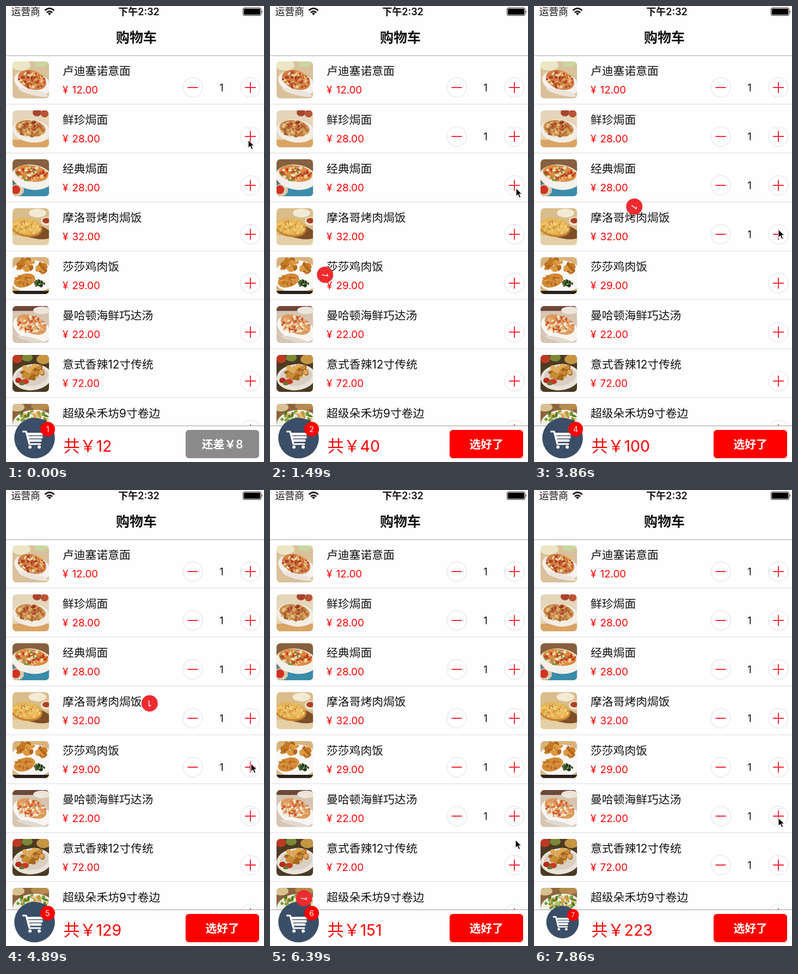
These frames come from a looping animation (474x839 px, 8 s). An HTML page:

```html
<!DOCTYPE html>
<html lang="zh-CN">
<head>
<meta charset="utf-8">
<title>购物车</title>
<style>
  html, body { margin: 0; width: 100%; height: 100%; overflow: hidden; background: #fff; }
  svg { display: block; width: 100vw; height: 100vh; }
  text { font-family: Inter, "Noto Sans CJK SC", "Noto Sans CJK", sans-serif; fill: #111; white-space: pre; }
  .mid { text-anchor: middle; }
  .red { fill: #f00; }
  .white { fill: #fff; }
</style>
</head>
<body>
<svg id="stage" viewBox="0 0 474 839">
  <defs>
    <clipPath id="photo"><rect width="67" height="68" rx="7"/></clipPath>
  </defs>
  <rect width="474" height="839" fill="#fefefe"/>

  <text x="9.5" y="17" font-size="17.8">运营商</text>
  <g fill="none" stroke="#111" stroke-width="2.7">
    <path d="M71.5 8.3Q80 .6 88.5 8.3"/>
    <path d="M74.9 12Q80 7.4 85.1 12"/>
  </g>
  <path d="M76.9 13.6Q80 10.9 83.1 13.6L80 17Z" fill="#111"/>
  <text class="mid" x="244" y="17" font-size="18" font-weight="600">下午2:32</text>
  <rect x="435.5" y="3.5" width="33" height="14" rx="2.5" fill="#fff" stroke="#111"/>
  <rect x="437" y="5" width="30" height="11" rx="1.2"/>
  <path d="M470 8q2 2.5 0 5z"/>
  <text class="mid" x="239.5" y="67" font-size="25" font-weight="600">购物车</text>
  <path d="M0 91.5H474" stroke="#a9a9a9"/>

  <g id="list"></g>

  <rect y="772" width="474" height="67" fill="#fefefe"/>
  <path d="M0 772.5H474" stroke="#9c9c9c"/>
  <text class="red" x="105.5" y="819.5" font-size="30">共￥</text>
  <text id="total" class="red" x="165.5" y="819.5" font-size="28.5"></text>
  <rect id="button" x="330" y="780" width="135" height="52" rx="6"/>
  <text id="label" class="mid white" x="397.7" y="813.5" font-size="20.8" font-weight="600"></text>

  <g id="cart">
    <circle cx="52.5" cy="795" r="37.3" fill="#3b4e68"/>
    <g fill="none" stroke="#fff" stroke-width="3.2" stroke-linecap="round" stroke-linejoin="round">
      <path d="M31.5 783H37L43 806H63"/>
      <path d="M40 787.5H67M41.5 793.5H65.5M43 799.5H63.5" stroke-width="4.5"/>
    </g>
    <circle cx="44" cy="811.5" r="3" fill="#fff"/>
    <circle cx="61" cy="811.5" r="3" fill="#fff"/>
    <circle cx="76.5" cy="778.5" r="13.5" fill="#f00"/>
    <text id="badge" class="mid white" x="76.5" y="783.5" font-size="14"></text>
  </g>

  <g id="ball">
    <circle r="15" fill="#ee2b30"/>
    <text class="mid white" y="5.5" font-size="15.5">1</text>
  </g>
  <path id="cursor" d="M0 0V15.5L3.6 12.2L6 18L8.8 16.8L6.4 11.2H11.2Z" fill="#000" stroke="#fff" stroke-width="1.2"/>
</svg>

<script>
const $ = id => document.getElementById(id);
const LOOP = 8000, TICK = 148.4, FLIGHT = 5;
const CART = { x: 53, y: 795 };
const PLUS_X = 449;

// start: tick at which the dish is added (0 = in the cart already)
const dishes = [
  { name: '卢迪塞诺意面', price: 12, start: 0 },
  { name: '鲜珍焗面', price: 28, start: 5.975 },
  { name: '经典焗面', price: 28, start: 15.425 },
  { name: '摩洛哥烤肉焗饭', price: 32, start: 23.235 },
  { name: '莎莎鸡肉饭', price: 29, start: 31.2 },
  { name: '曼哈顿海鲜巧达汤', price: 22, start: 38.215 },
  { name: '意式香辣12寸传统', price: 72, start: 47.04 },
  { name: '超级朵禾坊9寸卷边', price: 75, start: Infinity }
];

const oval = (x, y, rx, ry, fill, turn = 0) =>
  `<ellipse cx="${x}" cy="${y}" rx="${rx}" ry="${ry}" fill="${fill}" transform="rotate(${turn} ${x} ${y})"/>`;
const box = (y, h, fill) => `<rect y="${y}" width="67" height="${h}" fill="${fill}"/>`;

function random(seed) {
  return () => (seed = seed * 16807 % 2147483647) / 2147483647;
}

// scatter small pieces of food over an oval
function scatter(seed, x, y, rx, ry, n, size, colors) {
  const rnd = random(seed * 7919);
  let out = '';
  for (let i = 0; i < n; i++) {
    const a = rnd() * 6.283, d = Math.sqrt(rnd());
    out += oval(x + Math.cos(a) * d * rx, y + Math.sin(a) * d * ry,
      size * (.6 + rnd() * .6), size * (.4 + rnd() * .4), colors[i % colors.length], rnd() * 180);
  }
  return out;
}

const pasta = ['#b8482c', '#e2a55c', '#f0d3a0', '#a8381f', '#d27b3c'];
const fried = ['#c67a26', '#dc9a42', '#b4661c'];
const photos = [
  () => box(0, 68, '#d9c19a') + oval(16, 7, 17, 10, '#ece6c4') + oval(52, 4, 12, 7, '#c9d6a2') +
    oval(37, 40, 35, 21, '#f5f1ec', 20) + oval(36, 34, 27, 17, '#cf8149', 20) +
    scatter(1, 36, 34, 25, 15, 80, 3.2, pasta) + oval(38, 57, 28, 5, '#ece4dc', 14),
  () => box(0, 68, '#e4d5ba') + box(54, 14, '#d9a564') + oval(45, 4, 8, 7, '#a9432d') +
    oval(59, 6, 7, 7, '#b85437') + oval(35, 38, 35, 21, '#f3ede4', 8) + oval(33, 33, 28, 15, '#c98d4e', 8) +
    scatter(2, 33, 34, 27, 14, 70, 3.2, ['#dfaa64', '#b97236', '#e7c48b', '#a5602c']) +
    scatter(3, 33, 29, 15, 8, 26, 3.2, ['#963a20', '#b85a34', '#d99a5a']),
  () => box(0, 68, '#86603f') + box(44, 24, '#3a8caa') + oval(8, 57, 13, 11, '#d9c9ae') +
    oval(36, 33, 38, 23, '#f4f0ea', 8) + oval(35, 26, 31, 15, '#d98d45', 8) +
    scatter(4, 35, 26, 29, 13, 80, 3.2, ['#c9331f', '#f2cf8b', '#e58a40', '#efe3c2', '#b5532c', '#7a9440']) +
    oval(6, 56, 8, 8, '#d4301e'),
  () => box(0, 68, '#d9bd8a') + box(50, 18, '#e4cfa6') + oval(46, 9, 16, 8, '#f3ead4') +
    oval(62, 24, 10, 8, '#f1e4ce') + oval(62, 23, 7, 5, '#ad3e22') +
    oval(38, 42, 35, 13, '#7e4e28', 14) + oval(26, 36, 29, 17, '#c98331', 8) +
    oval(26, 34, 27, 15, '#e7b556', 8) + scatter(5, 26, 34, 25, 13, 60, 2.6, ['#f2d486', '#d08c38', '#eec468']),
  () => box(0, 68, '#d8b27a') + oval(36, 36, 42, 30, '#faf8f5') + box(62, 6, '#2b211b') +
    scatter(6, 24, 14, 15, 8, 18, 7, fried) + scatter(7, 54, 21, 8, 7, 12, 6, fried) +
    oval(22, 43, 20, 12, '#d38a38', -18) + scatter(8, 22, 43, 17, 10, 30, 3, fried) +
    scatter(9, 50, 48, 9, 6, 30, 2.6, ['#2d451c', '#49692c', '#1f3415']),
  () => box(0, 68, '#d5c5b2') + box(0, 9, '#6d4836') + oval(54, 8, 16, 7, '#ede4da') +
    oval(36, 42, 37, 22, '#f8f5f1', 24) + oval(35, 34, 29, 16, '#dd9b5e', 24) +
    scatter(10, 35, 34, 26, 15, 80, 3.2, ['#f4dfba', '#c5522c', '#e7b47a', '#d97b42', '#f7ecd8']) +
    oval(34, 62, 28, 4, '#e2d9cf', 14),
  () => box(0, 68, '#4b3a24') + oval(8, 7, 10, 8, '#bd3a22') + oval(27, 5, 10, 7, '#7c8937') +
    oval(57, 8, 13, 9, '#c69542') + oval(36, 41, 36, 24, '#e9e3da', -6) + oval(36, 39, 30, 18, '#d8cfc3', -6) +
    scatter(11, 37, 31, 19, 13, 34, 6, ['#c98a35', '#dfa953', '#a8661f']) +
    oval(11, 47, 6, 5, '#b32c1b') + oval(23, 49, 7, 5, '#c73b24') + oval(17, 53, 5, 3, '#66752c'),
  () => box(0, 68, '#8c653d') + oval(8, 6, 14, 8, '#d9c193') + oval(52, 4, 18, 8, '#b58a4c') +
    oval(38, 36, 38, 25, '#f3efe6', -6) +
    scatter(12, 36, 26, 28, 13, 70, 4, ['#78a23b', '#a8c45c', '#d89a4a', '#4f7a27', '#e5c88c'])
];

const ring = x => `<circle cx="${x}" cy="58" r="18" fill="#fff" stroke="#dedede"/>`;
const bar = d => `<path d="${d}" stroke="#f8283a" stroke-width="2"/>`;

function rowMarkup(dish, i) {
  return `<g transform="translate(0 ${92 + i * 90})">
    <g transform="translate(12 10)" clip-path="url(#photo)">${photos[i]()}</g>
    <text x="104" y="34.5" font-size="20.8">${dish.name}</text>
    <text class="red" x="104" y="69" font-size="18.8">¥</text>
    <text class="red" x="121.5" y="69" font-size="18.8">${dish.price}.00</text>
    <g id="pick${i}">${ring(343)}${bar('M333.5 58H352.5')}
      <text class="mid" x="396" y="65" font-size="18.5">1</text></g>
    ${ring(PLUS_X)}${bar('M439 58H459M449 48V68')}
    <path d="M0 88.5H474" stroke="#dcdcdc"/>
  </g>`;
}
$('list').innerHTML = dishes.map(rowMarkup).join('');

// pointer stops: tick, x, y
const stops = [
  [0, 445, 246], [1, 444, 246], [6, 444, 246], [9, 452, 335], [16, 452, 335],
  [18, 450, 350], [21, 449, 411], [26, 449, 411], [30, 450, 503], [33, 450, 503],
  [37, 455, 599], [41, 455, 599], [45, 447, 688], [50, 447, 688], [53, 449, 603]
];

function pointer(n) {
  const i = Math.max(1, stops.findIndex(s => s[0] >= n));
  const [a, x, y] = stops[i - 1], [b, u, v] = stops[i];
  const k = (n - a) / (b - a);
  return [x + (u - x) * k, y + (v - y) * k];
}

// quadratic arc from the plus button to the cart, turned along its tangent
function arc(s, y0) {
  const x0 = PLUS_X, cx = 158.5, cy = y0 - 335, r = 1 - s;
  const at = (a, c, b) => r * r * a + 2 * s * r * c + s * s * b;
  const slope = (a, c, b) => r * (c - a) + s * (b - c);
  const turn = Math.atan2(slope(y0, cy, CART.y), slope(x0, cx, CART.x)) * 180 / Math.PI;
  return `translate(${at(x0, cx, CART.x)} ${at(y0, cy, CART.y)}) rotate(${turn})`;
}

const show = (el, on) => el.setAttribute('visibility', on ? 'visible' : 'hidden');

function render(time) {
  const n = Math.floor((time + 12) / TICK);
  let count = 0, total = 0, last = 0;
  dishes.forEach((dish, i) => {
    const added = n >= dish.start;
    show($('pick' + i), added);
    if (added) { count++; total += dish.price; last = i; }
  });
  $('badge').textContent = count;
  $('total').textContent = total;
  const ready = total >= 20;
  $('button').setAttribute('fill', ready ? '#f00' : '#8b8b8b');
  $('label').textContent = ready ? '选好了' : '还差￥' + (20 - total);

  const s = last ? (n - dishes[last].start) / FLIGHT : 2;
  show($('ball'), s < 1);
  if (s < 1) $('ball').setAttribute('transform', arc(s, 150 + last * 90));

  const beat = (s - 1) / .36;
  const scale = beat > 0 && beat < 1 ? 1 - .2 * Math.sin(Math.PI * beat) : 1;
  $('cart').setAttribute('transform', `translate(52.5 795) scale(${scale}) translate(-52.5 -795)`);
  $('cursor').setAttribute('transform', `translate(${pointer(n)})`);
}

const begin = performance.now();
function play() {
  render((performance.now() - begin) % LOOP);
  requestAnimationFrame(play);
}
play();
</script>
</body>
</html>
```
